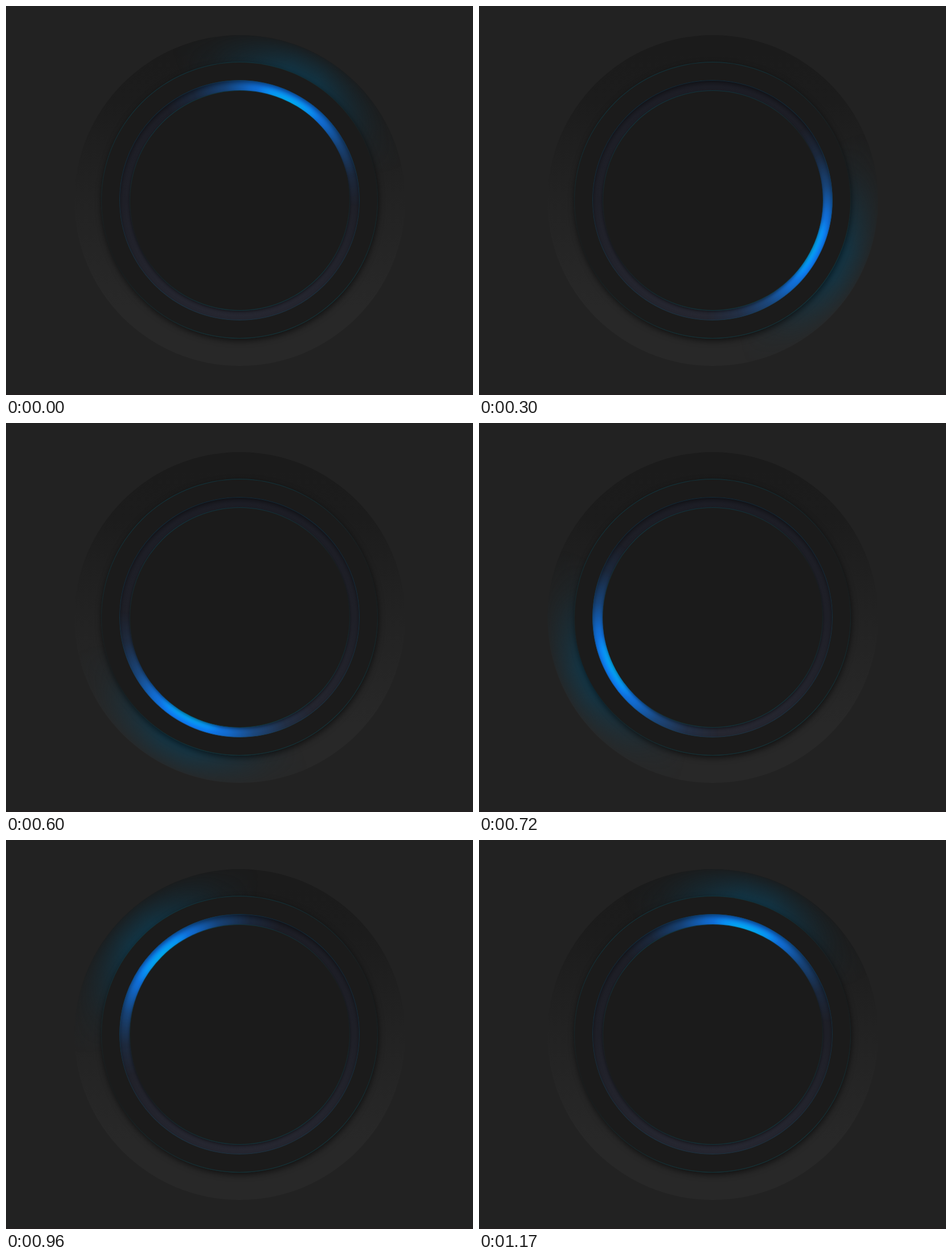
Recreate the animation shown at these times as an HTML page. Size 820x683 px, loop 1.2 s.

```html
<!DOCTYPE html>
<html lang="en">
<head>
<meta charset="utf-8">
<title>Ring light</title>
<style>
  html, body { margin: 0; width: 100%; height: 100%; overflow: hidden; background: #222; }
  body { position: relative; box-shadow: inset 0 -3px #242021; }

  .disc {
    position: absolute; left: 410.3px; top: 341.3px;
    width: var(--d); height: var(--d);
    margin: calc(var(--d) / -2);
    border-radius: 50%; box-sizing: border-box; overflow: hidden;
  }
  .rim {
    border: 1px solid transparent;
    background:
      linear-gradient(#1b1b1b 0 0) padding-box,
      linear-gradient(160deg, #12343c 15%, #191f20 45%, #171c1d 55%, #12343a 85%) border-box;
  }
  .spin, .shade { position: absolute; inset: 0; border-radius: 50%; }
  .spin { transform: rotate(var(--angle)); }

  .base { --d: 581px; background: linear-gradient(#1b1b1b 5%, #1c1c1c 20%, #222 48%, #282828 82%); }
  .halo {
    background: conic-gradient(from -52deg,
      #11394c00, #11394c26 14deg, #11394c80 30deg, #11394ce0 46deg, #11394ce0 58deg,
      #11394c80 74deg, #11394c26 90deg, #11394c00 104deg);
    -webkit-mask: radial-gradient(closest-side, #000 84%, #0008 93%, #0002 100%);
    mask: radial-gradient(closest-side, #000 84%, #0008 93%, #0002 100%);
  }
  .plate { --d: 486px; box-shadow: 1px 4px 11px rgba(0, 0, 0, .55); }

  .groove { --d: 422px; background: linear-gradient(#1d1e26, #1f2028 50%, #262731); }
  .beam {
    background:
      radial-gradient(60px 17px at 50% 20px, #00b4f0, #00b4f0a0 45%, #00b4f000),
      conic-gradient(from -66deg,
        #0f7cf500, #0f7cf51c 16deg, #0f7cf566 32deg, #0f7cf5cc 45deg, #0f7cf5 55deg, #0f7cf5 77deg,
        #0f7cf5cc 87deg, #0f7cf566 100deg, #0f7cf51c 116deg, #0f7cf500 132deg);
  }
  .shade { box-shadow: inset 0 0 0 1px #14465c80, inset 0 4px 8px rgba(0, 0, 0, .5); }
  .core { --d: 387px; box-shadow: 0 2px 5px rgba(0, 0, 0, .45); }
</style>
</head>
<body>
  <div class="disc base"><div class="spin halo"></div></div>
  <div class="disc rim plate"></div>
  <div class="disc groove"><div class="spin beam"></div><div class="shade"></div></div>
  <div class="disc rim core"></div>
<script>
  const LOOP = 1200, STEP = 30, START = 27;

  function draw() {
    const time = Math.floor(performance.now() % LOOP / STEP) * STEP;
    document.body.style.setProperty('--angle', `${START + time / LOOP * 360}deg`);
    requestAnimationFrame(draw);
  }
  draw();
</script>
</body>
</html>
```
